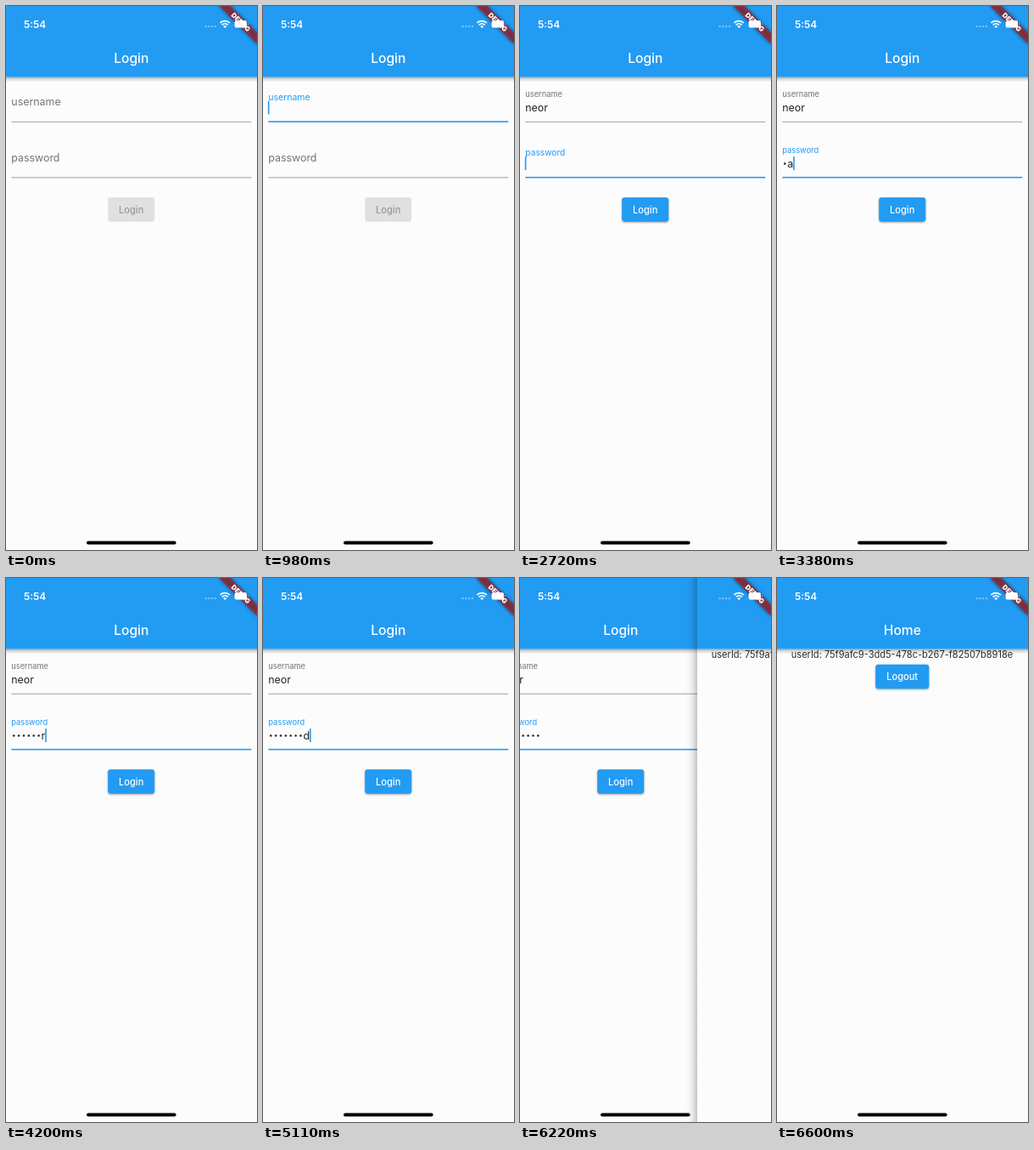
Write an HTML page that moves like this. It is 296x640 px and loops after 8000 ms.

```html
<!DOCTYPE html>
<html lang="en">
<head>
<meta charset="utf-8">
<title>Login</title>
<style>
  html, body { margin: 0; width: 100%; height: 100%; overflow: hidden; }
  svg { display: block; width: 100%; height: 100%; font-family: Inter, Roboto, sans-serif; }
  .blue { fill: #229bf3; }
  .page { fill: #fcfcfc; }
  .title { font-size: 15.6px; font-weight: 500; fill: #fff; text-anchor: middle; }
  .action { font-size: 11.05px; font-weight: 500; fill: #fff; text-anchor: middle; }
  .input, .label { font-size: 12.4px; }
  .input { fill: #222; }
  .raised { filter: drop-shadow(0 1.3px 1.2px rgba(0, 0, 0, .36)); }
</style>
</head>
<body>
<svg viewBox="0 0 296 640" preserveAspectRatio="none">
  <defs>
    <linearGradient id="drop" x2="0" y2="1">
      <stop stop-color="#000" stop-opacity=".34"/>
      <stop offset=".4" stop-color="#000" stop-opacity=".13"/>
      <stop offset="1" stop-color="#000" stop-opacity="0"/>
    </linearGradient>
    <linearGradient id="edge">
      <stop stop-color="#000" stop-opacity="0"/>
      <stop offset=".3" stop-color="#000" stop-opacity=".016"/>
      <stop offset=".6" stop-color="#000" stop-opacity=".07"/>
      <stop offset="1" stop-color="#000" stop-opacity=".22"/>
    </linearGradient>
    <filter id="soft" x="-20%" y="-80%" width="140%" height="260%">
      <feGaussianBlur stdDeviation="2.6"/>
    </filter>
    <g id="bar">
      <rect y="83.6" width="296" height="6" fill="url(#drop)"/>
      <rect class="blue" width="296" height="83.6"/>
    </g>
  </defs>

  <g id="login">
    <rect class="page" width="296" height="640"/>
    <g id="fields"></g>
    <g id="button">
      <rect id="face" x="120.2" y="225.3" width="55" height="28.4" rx="3.1"/>
      <text id="caption" class="action" x="147.7" y="243.5">Login</text>
    </g>
    <path id="spinner" fill="none" stroke="#229bf3" stroke-width="3.16"/>
    <use href="#bar"/>
    <text class="title" x="147.8" y="67.2">Login</text>
  </g>

  <g id="home">
    <rect x="-14.8" width="14.8" height="640" fill="url(#edge)"/>
    <rect class="page" width="296" height="640"/>
    <text x="147.5" y="94" font-size="11.05" fill="#2b2b2b" text-anchor="middle">userId: 75f9afc9-3dd5-478c-b267-f82507b8918e</text>
    <rect class="blue raised" x="116.2" y="101.8" width="63" height="28.4" rx="3.1"/>
    <text class="action" x="147.7" y="120">Logout</text>
    <use href="#bar"/>
    <text class="title" x="147.8" y="67.2">Home</text>
  </g>

  <g transform="translate(296 0) rotate(45) scale(.789)">
    <rect x="-40" y="28" width="80" height="12" opacity=".5" filter="url(#soft)"/>
    <rect x="-40" y="28" width="80" height="12" fill="#b71c1c" fill-opacity=".63"/>
    <text y="37.7" font-size="10.2" font-weight="900" fill="#fff" text-anchor="middle">DEBUG</text>
  </g>

  <g fill="#fff">
    <text x="21" y="25.8" font-size="11.8" font-weight="600">5:54</text>
    <g opacity=".4">
      <circle cx="235.6" cy="24" r="1.2"/><circle cx="239.4" cy="24" r="1.2"/>
      <circle cx="243.2" cy="24" r="1.2"/><circle cx="247" cy="24" r="1.2"/>
    </g>
    <path d="M258.2 26l-2-2.1a2.9 2.9 0 0 1 4 0z"/>
    <path d="M254.7 22.4a5 5 0 0 1 7 0M252.5 20a8.1 8.1 0 0 1 11.4 0" fill="none" stroke="#fff" stroke-width="1.7"/>
    <rect x="269.6" y="17" width="14.4" height="8.4" rx="2.2"/>
    <path d="M285 19.8q1.4 1.4 0 2.8z"/>
  </g>
  <rect x="95" y="629.6" width="105.6" height="4" rx="2"/>
</svg>

<script>
const NS = 'http://www.w3.org/2000/svg';
const LOOP = 8000, BLUE = '#229bf3', LEFT = 6.3, DOT = 5.87;
const NAME = 'neor', SECRET = 'password';
const NAME_FOCUS = 900, PASS_FOCUS = 2630, NAME_START = 1860, SUBMIT = 5500, PUSH = 6175;

// The screen only refreshes at these moments.
const TICKS = [0, 980, 1090, 1630, 1750, 1860, 1990, 2120, 2580, 2720, 2850,
  3150, 3260, 3370, 3480, 3760, 3870, 3990, 4200, 4870, 4990, 5110,
  5520, 5640, 5770, 5890, 6000, 6110, 6220, 6360, 6500, 6600];
// [time, characters typed]
const NAME_KEYS = [[1860, 1], [1990, 3], [2120, 4]];
const PASS_KEYS = [[3260, 1], [3370, 2], [3480, 3], [3760, 4], [3870, 5], [3990, 6], [4200, 7], [5110, 8]];
// [time, cursor opacity]
const BLINKS = [[0, 1], [1630, .5], [1750, 0], [1860, 1], [2580, .5], [2720, 1],
  [3150, .5], [3260, 1], [4870, .5], [4990, 0], [5110, 1]];

const $ = id => document.getElementById(id);
const set = (el, attrs) => { for (const k in attrs) el.setAttribute(k, attrs[k]); return el; };
const add = (parent, tag, attrs) => parent.appendChild(set(document.createElementNS(NS, tag), attrs));
const clamp = x => Math.min(1, Math.max(0, x));
const mix = (a, b, p) => a + (b - a) * p;
const mixColor = (a, b, p) => `rgb(${a.map((v, i) => Math.round(mix(v, b[i], p)))})`;
const latest = (list, t, none = 0) => list.reduce((v, [at, val]) => t >= at ? val : v, none);

function bezier(x1, y1, x2, y2) {
  const at = (a, b, u) => 3 * (1 - u) ** 2 * u * a + 3 * (1 - u) * u * u * b + u ** 3;
  return x => {
    if (x <= 0 || x >= 1) return clamp(x);
    let lo = 0, hi = 1;
    for (let i = 0; i < 24; i++) {
      const mid = (lo + hi) / 2;
      if (at(x1, x2, mid) < x) lo = mid; else hi = mid;
    }
    return at(y1, y2, lo);
  };
}
const standard = bezier(.4, 0, .2, 1);
const slide = bezier(.35, .91, .33, .97);

function makeField(name, top) {
  const g = add($('fields'), 'g', { transform: `translate(0 ${top})` });
  const label = add(g, 'text', { class: 'label' });
  label.textContent = name;
  return {
    label,
    line: add(g, 'rect', { x: LEFT, width: 283 }),
    dots: Array.from(SECRET, (_, i) => add(g, 'circle', { cx: LEFT + DOT * (i + .5), cy: 119.9, r: 1.25, fill: '#222' })),
    text: add(g, 'text', { class: 'input', y: 124 }),
    cursor: add(g, 'rect', { y: 111.5, width: 1.6, height: 16, fill: BLUE })
  };
}
const userField = makeField('username', 0);
const passField = makeField('password', 65.6);

function drawField(f, { lift, focus, hidden, shown, blink }) {
  set(f.label, {
    transform: `translate(${LEFT} ${mix(117, 107, lift)}) scale(${mix(1, .75, lift)})`,
    fill: focus ? BLUE : '#757575'
  });
  set(f.line, focus ? { y: 135.3, height: 1.6, fill: BLUE } : { y: 135.8, height: .9, fill: '#949494' });
  f.dots.forEach((d, i) => set(d, { opacity: i < hidden ? 1 : 0 }));
  const x = LEFT + hidden * DOT;
  f.text.textContent = shown;
  set(f.text, { x });
  const width = shown ? f.text.getComputedTextLength() : 0;
  set(f.cursor, { x: x + width - (shown ? 0 : .5), opacity: focus ? blink : 0 });
}

function drawSpinner(ms) {
  const stride = ms / 1333 % 1;
  const head = standard(clamp(stride * 2)), tail = standard(clamp(stride * 2 - 1));
  const start = -Math.PI / 2 + tail * 1.5 * Math.PI + ms / 2222 * 2 * Math.PI + ms / 1333 * Math.PI / 2;
  const sweep = Math.max((head - tail) * 1.5 * Math.PI, .02);
  const point = a => `${147.9 + 14.2 * Math.cos(a)} ${234.7 + 14.2 * Math.sin(a)}`;
  set($('spinner'), { d: `M${point(start)}A14.2 14.2 0 ${sweep > Math.PI ? 1 : 0} 1 ${point(start + sweep)}` });
}

function draw(time) {
  const t = TICKS.filter(k => k <= time).pop();
  const blink = latest(BLINKS, t);
  const onPass = t >= PASS_FOCUS, pushed = t >= PUSH;

  drawField(userField, {
    lift: standard(clamp((t - NAME_FOCUS) / 200)),
    focus: t >= NAME_FOCUS && !onPass,
    hidden: 0, shown: NAME.slice(0, latest(NAME_KEYS, t)), blink
  });
  const typed = latest(PASS_KEYS, t);
  const hidden = pushed ? typed : Math.max(0, typed - 1);
  drawField(passField, {
    lift: standard(clamp((t - PASS_FOCUS) / 200)),
    focus: onPass,
    hidden, shown: SECRET.slice(hidden, typed), blink: pushed ? 0 : blink
  });

  const loading = t >= SUBMIT && !pushed;
  const on = standard(clamp((t - NAME_START) / 200));
  set($('button'), { opacity: loading ? 0 : 1 });
  set($('face'), { class: on > .5 ? 'raised' : '', fill: mixColor([224, 224, 224], [34, 155, 243], on) });
  $('caption').style.fill = mixColor([153, 153, 153], [255, 255, 255], on);
  set($('spinner'), { opacity: loading ? 1 : 0 });
  if (loading) drawSpinner(t - SUBMIT);

  const p = slide((t - PUSH) / 400);
  set($('login'), { transform: `translate(${-p * 296 / 3} 0)` });
  set($('home'), { transform: `translate(${(1 - p) * 296} 0)`, opacity: pushed ? 1 : 0 });
}

const began = performance.now();
function frame() {
  draw((performance.now() - began) % LOOP);
  requestAnimationFrame(frame);
}
frame();
</script>
</body>
</html>
```
